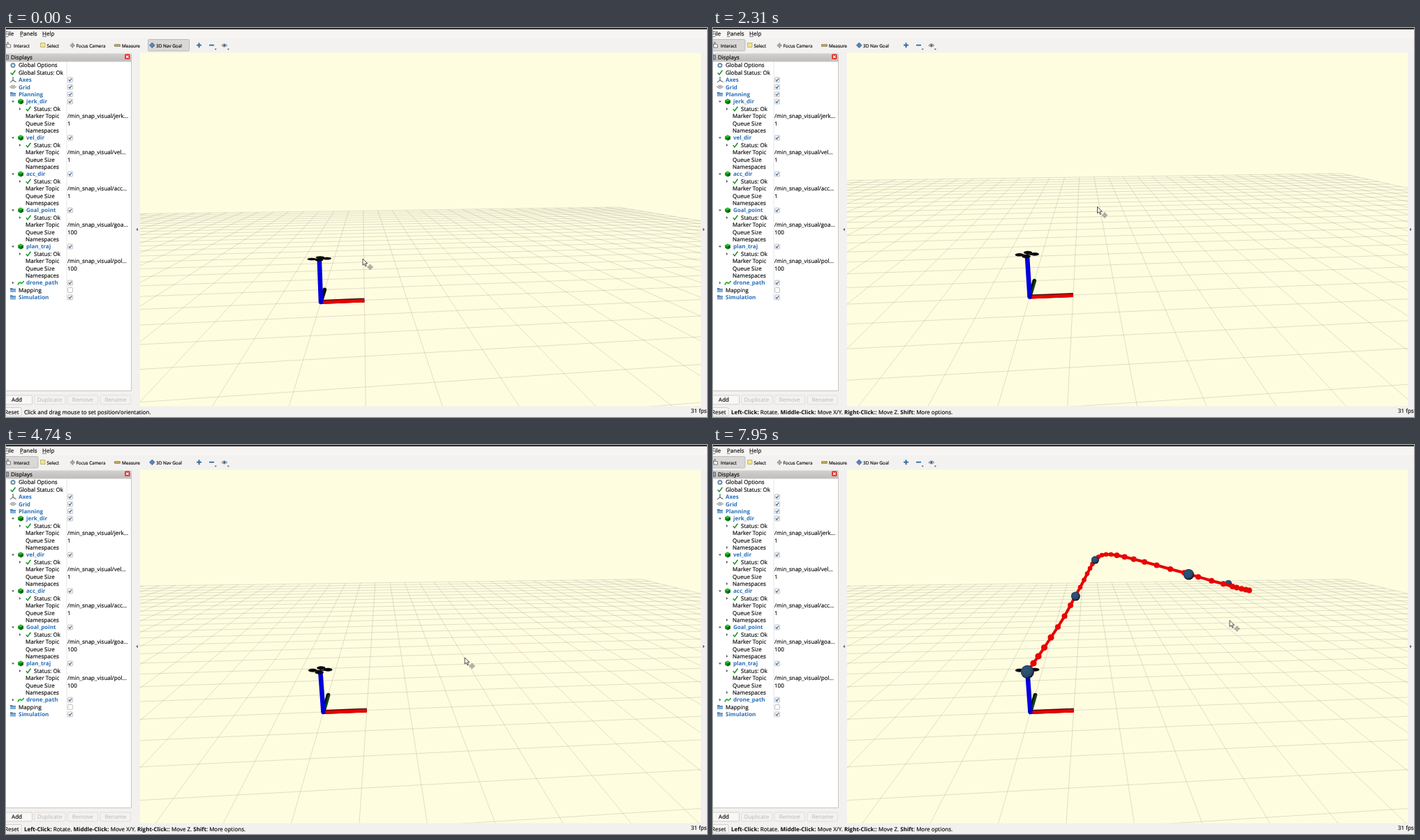
Recreate the animation shown at these times as an HTML page. Size 1004 px wide and 558 px high, loop 8000 ms.

```html
<!DOCTYPE html>
<html lang="en">
<head>
<meta charset="utf-8">
<title>Drone planner view</title>
<style>
html, body { margin: 0; width: 100%; height: 100%; overflow: hidden; background: #f2f1f0; }
svg { display: block; width: 1004px; height: 558px; }
text { font: 8px "Open Sans", "Noto Sans", sans-serif; fill: #0c0c0c; stroke: #0c0c0c; stroke-width: .18px; text-rendering: geometricPrecision; white-space: pre; }
.b { font-weight: 700; stroke: none; }
.link { font-weight: 700; fill: #2a6fb8; stroke: none; }
.tool { font-size: 6.4px; }
.off { fill: #b9b6b2; stroke: none; }
.mid { text-anchor: middle; }
.btn { fill: #f8f7f6; stroke: #c5c2be; stroke-width: .7; }
.btn.dim { fill: #f3f2f1; stroke: #d8d5d2; }
.on { fill: #dad8d6; stroke: #b4b1ae; stroke-width: .8; }
</style>
</head>
<body>
<svg viewBox="0 0 1004 558">
  <defs>
    <clipPath id="view"><rect x="192" y="35.5" width="803" height="507"/></clipPath>
    <linearGradient id="head" x2="0" y2="1"><stop stop-color="#d3d1cf"/><stop offset="1" stop-color="#bfbdbb"/></linearGradient>
    <radialGradient id="ball" cx=".42" cy=".4" r=".62"><stop stop-color="#30557c"/><stop offset=".75" stop-color="#28486a"/><stop offset="1" stop-color="#16222f"/></radialGradient>
    <g id="cube"><path d="M0-4 3.8-2V2L0 4-3.8 2V-2Z" fill="#0b8a12"/><path d="M0-4 3.8-2 0 0-3.8-2Z" fill="#2fc034"/><path d="M0 0 3.8-2V2L0 4Z" fill="#06650b"/></g>
    <path id="tick" d="M-3.3.4-1 3 3.4-3.2" fill="none" stroke="#159021" stroke-width="1.5"/>
    <g id="box"><rect x="-3.4" y="-3.4" width="6.8" height="6.8" rx=".8" fill="#fff" stroke="#a5a2a0" stroke-width=".7"/></g>
    <path id="checked" d="M-2-.1-.6 1.7 2.1-2" fill="none" stroke="#2b5f9e" stroke-width="1.2"/>
    <path id="open" d="M-2-1H2L0 1.4Z" fill="#555"/>
    <path id="shut" d="M-1-2V2L1.3 0Z" fill="#555"/>
    <g id="folder"><path d="M-4-3H-1L0-2H4V3H-4Z" fill="#4d7fb3"/><path d="M-4-.8H4V3H-4Z" fill="#85b0da"/></g>
    <path id="diamond" d="M0-3.8 3.8 0 0 3.8-3.8 0Z" fill="#5b84bd" stroke="#34557f" stroke-width=".8"/>
    <path id="move" d="M0-4 1.5-2.4H.6V-.6H2.4V-1.5L4 0 2.4 1.5V.6H.6V2.4H1.5L0 4-1.5 2.4H-.6V.6H-2.4V1.5L-4 0-2.4-1.5V-.6H-.6V-2.4H-1.5Z" fill="#d9d9d0" stroke="#6a6a66" stroke-width=".6"/>
  </defs>
  <g id="ui"></g>
  <g clip-path="url(#view)">
    <rect x="192" y="35" width="803" height="508" fill="#fffde0"/>
    <path id="grid" fill="none" stroke="#96968e" stroke-opacity=".44" stroke-width=".7"/>
    <g id="axes"></g>
    <g id="drone"></g>
    <g id="route"></g>
    <g id="cursor">
      <path d="M0 0V9.2L2.2 7.2 3.8 10.8 5.3 10.1 3.8 6.7H6.7Z" fill="#fff" stroke="#222" stroke-width=".8"/>
      <use id="moveIcon" href="#move" x="10.5" y="12"/>
      <use id="goalIcon" href="#diamond" x="10.3" y="12"/>
    </g>
  </g>
</svg>
<script>
const LOOP = 8000;
const $ = id => document.getElementById(id);
const txt = (x, y, s, cls = '') => `<text x="${x}" y="${y + 2.9}" class="${cls}">${s}</text>`;
const use = (id, x, y) => `<use href="#${id}" x="${x}" y="${y}"/>`;
const rect = (x, y, w, h, attr) => `<rect x="${x}" y="${y}" width="${w}" height="${h}" ${attr}/>`;
const path = (d, attr) => `<path d="${d}" ${attr}/>`;
const circle = (x, y, r, fill) => `<circle cx="${x}" cy="${y}" r="${r}" fill="${fill}"/>`;

/* ---- window chrome ---- */
function toolbar() {
  return rect(0, 0, 1004, 2, 'fill="#2d2b2c"') + rect(0, 2, 1004, 13, 'fill="#f6f5f4"') +
    rect(0, 15, 1004, 20, 'fill="#f3f2f1"') +
    txt(-1.5, 8, 'File') + txt(20, 8, 'Panels') + txt(52, 8, 'Help') +
    path('M0 12.3H3.5M20 12.3H24.5M52 12.3H58', 'stroke="#222" stroke-width=".6"') +
    rect(-3, 16.5, 49, 16.5, 'id="interact" class="on" rx="1.5"') +
    rect(203.5, 16.5, 59, 16.5, 'id="navGoal" class="on" rx="1.5"') +
    path('M1 28V25L0 23.6 1 23 2 24.2V20.5H3.2V23.2L6.5 24V28Z', 'fill="#fff" stroke="#444" stroke-width=".7"') +
    txt(11, 25, 'Interact', 'tool') +
    rect(49.5, 21.5, 6.5, 6, 'fill="#f4e48a" stroke="#8c7f38" stroke-width=".7" stroke-dasharray="1.4 .7"') +
    txt(58.5, 25, 'Select', 'tool') +
    path('M91.5 25H99M95.2 21V29', 'stroke="#888" stroke-width="1"') +
    '<circle cx="95.2" cy="25" r="2.3" fill="none" stroke="#777" stroke-width=".8"/>' +
    txt(100.5, 25, 'Focus Camera', 'tool') +
    rect(155.7, 23.8, 7.6, 2.4, 'fill="#d0b85a" stroke="#5f5424" stroke-width=".7"') +
    txt(166, 25, 'Measure', 'tool') + use('diamond', 209.3, 24.8) + txt(215, 25, '3D Nav Goal', 'tool') +
    path('M273 24.7H280M276.5 21.2V28.2M291 24.7H298', 'stroke="#2c6496" stroke-width="1.8"') +
    path('M308.8 25Q312.8 20.8 316.8 25Q312.8 29 308.8 25Z', 'fill="#e3e7ea" stroke="#555" stroke-width=".7"') +
    circle(312.8, 24.8, 1.6, '#335a7c') +
    path('M298.6 29.8H301.8L300.2 31.4ZM316.8 29.8H320L318.4 31.4Z', 'fill="#444"');
}

function displays() {
  const rowY = i => 53.5 + 10.4 * i;
  let s = rect(0, 36.5, 180, 11.3, 'fill="url(#head)"') +
    rect(0, 39, 3.5, 6, 'fill="#8aa9c8" stroke="#444" stroke-width=".7"') + txt(7, 42, 'Displays') +
    rect(170.2, 37.6, 7.2, 7.2, 'rx="1.4" fill="#e0201a"') +
    path('M172 39.4 175.6 43M175.6 39.4 172 43', 'stroke="#fff" stroke-width="1.4"') +
    rect(-1, 48, 180.5, 472.5, 'fill="#fff" stroke="#bdbab7" stroke-width=".8"') +
    path('M87 48.5V391.5', 'stroke="#dcdad8" stroke-width=".7"');
  const check = (i, on = true) => use('box', 92, rowY(i)) + (on ? use('checked', 92, rowY(i)) : '');

  s += circle(10, rowY(0), 2.6, 'none" stroke="#6c8eae" stroke-width="2') + txt(18, rowY(0), 'Global Options');
  s += use('tick', 10, rowY(1)) + txt(18, rowY(1), 'Global Status: Ok');
  s += path('M10 70V75L6 78M10 75 14.5 77.5', 'fill="none" stroke="#344" stroke-width="1"') + txt(18, rowY(2), 'Axes', 'link') + check(2);
  s += path('M5.5 84.5 10 82 14.5 84.5 10 87ZM7.7 83.2 12.3 85.8M12.3 83.2 7.7 85.8', 'fill="none" stroke="#666" stroke-width=".7"') + txt(18, rowY(3), 'Grid', 'link') + check(3);
  s += use('folder', 10, rowY(4)) + txt(18, rowY(4), 'Planning', 'link') + check(4);

  let spaces = '';
  [['jerk_dir', 'jerk', 1], ['vel_dir', 'vel', 1], ['acc_dir', 'acc', 1], ['Goal_point', 'goa', 100], ['plan_traj', 'pol', 100]]
    .forEach(([name, topic, size], n) => {
      const r = 5 + n * 5;
      s += use('open', 10, rowY(r)) + use('cube', 21, rowY(r)) + txt(29, rowY(r), name, 'link') + check(r) +
        use('shut', 20, rowY(r + 1)) + use('tick', 32, rowY(r + 1)) + txt(40, rowY(r + 1), 'Status: Ok') +
        txt(28, rowY(r + 2), 'Marker Topic') + txt(88, rowY(r + 2), `/min_snap_visual/${topic}...`) +
        txt(28, rowY(r + 3), 'Queue Size') + txt(88, rowY(r + 3), size) +
        txt(28, rowY(r + 4), 'Namespaces');
      spaces += use('shut', 20, rowY(r + 4));
    });
  s += `<g id="spaces">${spaces}</g>`;

  s += use('shut', 10, rowY(30)) + path('M17 368.5Q19 363.5 21 365.5T25.5 362.8', 'fill="none" stroke="#20b52a" stroke-width="1.8"') +
    txt(29, rowY(30), 'drone_path', 'link') + check(30);
  s += use('folder', 10, rowY(31)) + txt(18, rowY(31), 'Mapping') + check(31, false);
  s += use('folder', 10, rowY(32)) + txt(18, rowY(32), 'Simulation', 'link') + check(32);

  [['Add', -3, 40.5, 15.5], ['Duplicate', 40.5, 44.5, 62.5], ['Remove', 88, 43.5, 109.8], ['Rename', 135, 43.5, 156.8]]
    .forEach(([name, x, w, mid], i) => {
      s += rect(x, 527, w, 12.8, `rx="1.5" class="btn ${i ? 'dim' : ''}"`) + txt(mid, 533.4, name, i ? 'mid off' : 'mid');
    });
  return s;
}

function statusBar() {
  const bold = s => `<tspan class="b">${s}</tspan>`;
  const help = bold('Left-Click:') + ' Rotate. ' + bold('Middle-Click:') + ' Move X/Y. ' +
    bold('Right-Click:') + ': Move Z. ' + bold('Shift') + ': More options.';
  return rect(-3, 544.5, 25, 12, 'rx="1.5" class="btn"') + txt(-2, 550.6, 'Reset') +
    `<g id="helpInteract">${txt(26, 550.6, help)}</g>` +
    `<g id="helpGoal">${txt(26, 550.6, 'Click and drag mouse to set position/orientation.')}</g>` +
    txt(981, 548.8, '31 fps') +
    path('M188.8 286.8V291.2L186.3 289ZM998.2 286.8V291.2L1000.7 289Z', 'fill="#555"');
}

$('ui').innerHTML = rect(0, 0, 1004, 558, 'fill="#f2f1f0"') + toolbar() + displays() + statusBar();

/* ---- 3D view: pinhole camera, 45 degree field of view ---- */
const FOCAL = 612, CX = 593.5, CY = 289, DEPTH = 9.9, HALF = 20;
const mix = (a, b, k) => a + (b - a) * k;

// k = 0 is the low camera, k = 1 the raised one
function camera(k) {
  const pitch = mix(8.6, 17, k) * Math.PI / 180, yaw = mix(7.6, 5.2, k) * Math.PI / 180;
  const sp = Math.sin(pitch), cp = Math.cos(pitch), sy = Math.sin(yaw), cy = Math.cos(yaw);
  const ox = (mix(451, 454.5, k) - CX) * DEPTH / FOCAL, oy = (mix(393, 383, k) - CY) * DEPTH / FOCAL;
  const toCam = (x, y, z) => {
    const right = x * cy - y * sy, ahead = x * sy + y * cy;
    return [ox + right, oy - ahead * sp - z * cp, DEPTH + ahead * cp - z * sp];
  };
  const flat = ([x, y, z]) => [CX + FOCAL * x / z, CY + FOCAL * y / z];
  return { toCam, flat, at: (x, y, z) => flat(toCam(x, y, z)) };
}

const pt = p => p.map(v => v.toFixed(2)).join(' ');

function gridPath(cam) {
  const near = .3;
  const line = (a, b) => {
    if (a[2] < near && b[2] < near) return '';
    const cut = (p, q) => p[2] >= near ? p : p.map((v, i) => mix(v, q[i], (near - p[2]) / (q[2] - p[2])));
    return `M${pt(cam.flat(cut(a, b)))}L${pt(cam.flat(cut(b, a)))}`;
  };
  let d = '';
  for (let i = -HALF; i <= HALF; i++) {
    d += line(cam.toCam(i, -HALF, 0), cam.toCam(i, HALF, 0));
    d += line(cam.toCam(-HALF, i, 0), cam.toCam(HALF, i, 0));
  }
  return d;
}

function axesSvg(cam, k) {
  const o = cam.at(0, 0, 0), x = cam.at(1, 0, 0), y = cam.at(0, 1, 0), z = cam.at(0, 0, 1);
  const bar = (a, b, color, w, dx = 0, dy = 0) =>
    path(`M${pt([a[0] + dx, a[1] + dy])}L${pt([b[0] + dx, b[1] + dy])}`, `stroke="${color}" stroke-width="${w}"`);
  return bar(o, y, '#06120a', 5.6) + circle(y[0], y[1], 2.7, '#06120a') +
    bar(o, y, '#0d4a18', 2.6 * k, 1.2) +
    bar(o, x, '#3a0505', 6) + bar(o, x, '#e60000', 4.8, 0, .6) +
    bar(o, z, '#0000dc', 6.6) + circle(o[0], o[1], 3.2, '#0000c4');
}

function droneSvg(cam, k) {
  const [x, y] = cam.at(0, 0, 1.02), ry = mix(1.8, 2.5, k);
  const hubs = [[-11, .2 - .6 * k], [11, -.7 - .7 * k], [1.2, -2.2 - 1.7 * k], [-.5 - k, 1.5 + 1.1 * k]];
  return hubs.map(([dx, dy]) =>
    path(`M${pt([x, y])}l${dx} ${dy}`, 'stroke="#111" stroke-width="1.8"') +
    `<ellipse cx="${x + dx}" cy="${y + dy}" rx="6.2" ry="${ry}" fill="#080808"/>`).join('');
}

/* ---- planned route ---- */
const stops = [[450, 325], [459, 313], [466, 303], [474.5, 290.5], [484, 276], [494, 261], [503.5, 245.5], [512, 230],
  [519, 216.5], [526, 204], [531.5, 193.5], [536, 184.5], [540, 177], [543.5, 170.5], [547, 164.5], [552, 160.5],
  [557, 158], [563, 157], [570, 157], [578.5, 158.3], [589.5, 160.5], [602.5, 163.7], [618, 167.7], [635.5, 172.5],
  [655, 178], [675, 183.3], [695, 189.2], [714, 194.7], [731, 199.3], [744, 203], [750, 204.6], [757, 206.2], [763, 207.6], [768, 208.6]];
const goals = [[450, 325, 9.5], [519, 216.5, 6.4], [547, 164.5, 5.5], [681, 185.2, 7.6]];
const ball = ([x, y, r]) => circle(x + .4, y + .6, r, '#101820') + circle(x, y, r - .4, 'url(#ball)');
$('route').innerHTML = ball([738, 198, 4.6]) +
  path('M' + stops.join('L'), 'fill="none" stroke="#e60000" stroke-width="4" stroke-linejoin="round"') +
  stops.map(([x, y], i) => circle(x, y, i < 5 ? 4.6 : i > 8 && i < 19 ? 3.3 : 4, '#e80404')).join('') +
  goals.map(ball).join('');

/* ---- timeline ---- */
const moves = [[0, 511, 331], [90, 511, 331], [840, 513, 331.5], [1410, 513, 331.5], [2190, 550.5, 256.5],
  [2540, 550.5, 256.5], [2930, 551.3, 256], [3360, 551.3, 256], [4120, 672, 292], [4740, 657, 305], [5020, 660, 306],
  [5760, 664, 308], [5830, 664, 308], [6170, 736, 210.5], [6650, 736, 210.5], [6980, 737, 212], [7390, 737, 212],
  [7950, 740, 251.5], [LOOP, 740, 251.5]];
const goalSpans = [[0, 1410], [2540, 3360], [4900, 5830], [6080, 6850]];
const CURSOR_LAG = 90;

function cursorAt(t) {
  const i = moves.findIndex(m => m[0] > t);
  const [t0, x0, y0] = moves[i - 1], [t1, x1, y1] = moves[i];
  const u = (t - t0) / (t1 - t0), e = u * u * (3 - 2 * u);
  return [mix(x0, x1, e), mix(y0, y1, e)];
}

const tiltAt = t => t < 2250 ? 0 : t < 2310 ? .35 : t < 2370 ? .75 : 1;
const show = (id, on) => { $(id).style.display = on ? '' : 'none'; };

let lastTilt = -1;
function draw(t) {
  const tilt = tiltAt(t);
  if (tilt !== lastTilt) {
    const cam = camera(tilt);
    $('grid').setAttribute('d', gridPath(cam));
    $('axes').innerHTML = axesSvg(cam, tilt);
    $('drone').innerHTML = droneSvg(cam, tilt);
    lastTilt = tilt;
  }
  const span = goalSpans.find(([a, b]) => t >= a && t < b);
  const goalCursor = !!span && t >= span[0] + CURSOR_LAG;
  show('navGoal', span);
  show('interact', !span);
  show('helpGoal', span);
  show('helpInteract', !span);
  show('goalIcon', goalCursor);
  show('moveIcon', !goalCursor);
  show('route', t >= 7160);
  show('spaces', t >= 7160);
  $('cursor').setAttribute('transform', `translate(${pt(cursorAt(t))})`);
}

const start = performance.now();
function tick(now) {
  draw(Math.max(0, now - start) % LOOP);
  requestAnimationFrame(tick);
}
draw(0);
requestAnimationFrame(tick);
</script>
</body>
</html>
```
